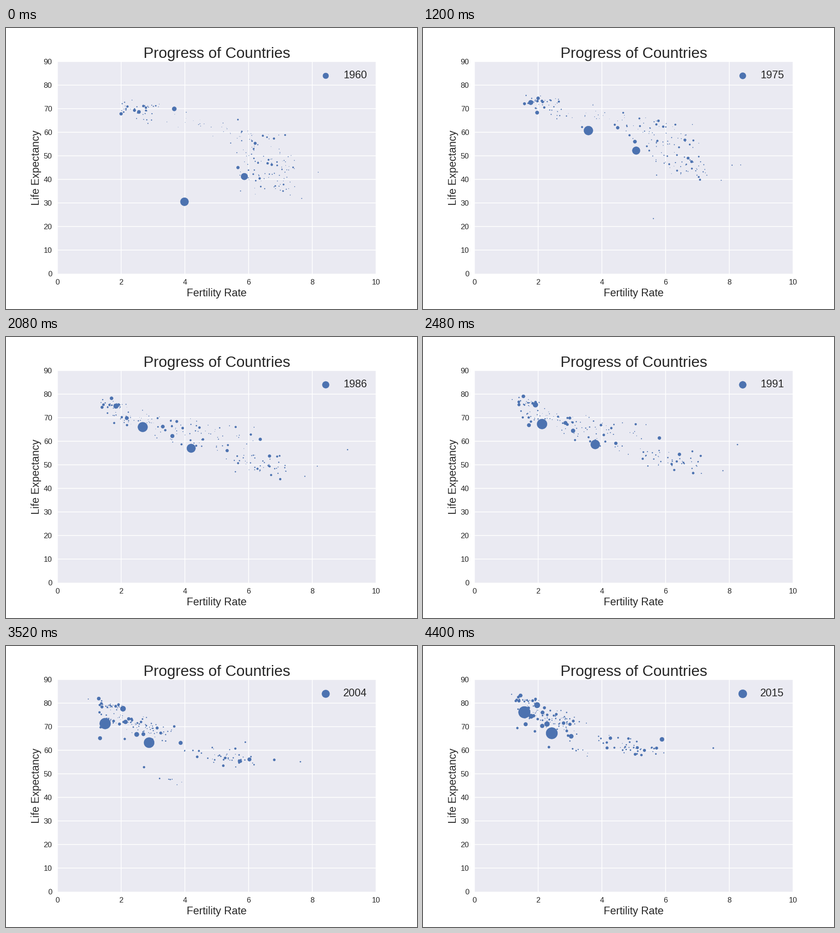
A matplotlib script for the animation above (4.48 s loop, 903 by 620 pixels).

```python
import numpy as np
import matplotlib.pyplot as plt
from matplotlib.animation import FuncAnimation

W, H, DPI = 903, 620, 120
BLUE, PANEL, INK = "#4C72B0", "#EAEAF2", "#262626"
PEOPLE_PER_AREA = 5.65  # millions per square point

plt.rcParams["font.family"] = "Liberation Sans"
plt.rcParams["text.color"] = INK

YEARS = np.arange(1960, 2016)
PROGRESS = (YEARS - YEARS[0]) / (YEARS[-1] - YEARS[0])
ANCHORS = [1960, 1966, 1975, 1986, 1995, 2004, 2015]
rng = np.random.default_rng(11)
countries = []  # (population, fertility, life expectancy) series


def growth(start, end):
    return start * (end / start) ** PROGRESS


def dip(year, depth, width):
    return depth * np.exp(-((YEARS - year) / width) ** 2)


def track(pop, fert, life, shock=0, fert_years=ANCHORS, life_years=ANCHORS):
    """A country that follows known points."""
    countries.append((growth(*pop),
                      np.interp(YEARS, fert_years, fert),
                      np.interp(YEARS, life_years, life) - shock))


def transition(p0, p1, f0, f1, mid, width, l0, l1, bend, shock=0):
    """A country whose fertility falls along a logistic curve."""
    s = 1 / (1 + np.exp(-(YEARS - mid) / width))
    s = (s - s[0]) / (s[-1] - s[0])
    countries.append((growth(p0, p1), f0 + (f1 - f0) * s,
                      l0 + (l1 - l0) * PROGRESS ** bend - shock))


def lerp(span, u):
    return span[0] + (span[1] - span[0]) * u


def crowd(n, pop, spread, grow, f0, f1, mid, l0, l1, bend, noise=2.0, shock=0):
    """Small countries: higher fertility goes with shorter lives."""
    for _ in range(n):
        q = rng.random()
        r = 0.5 * q + 0.5 * rng.random()
        start = min(pop * np.exp(spread * rng.normal()), 20)
        wobble = rng.normal(0, noise, 2).clip(-2 * noise, 2 * noise)
        transition(start, start * grow * rng.uniform(0.75, 1.25),
                   lerp(f0, q), lerp(f1, r),
                   rng.uniform(*mid), rng.uniform(3.5, 8),
                   lerp(l0, q) + wobble[0], lerp(l1, r) + 0.6 * wobble[1],
                   bend * rng.uniform(0.85, 1.15), shock)


# The largest populations
track((667, 1376),
      [3.99, 3.28, 5.97, 7.4, 6.14, 6.05, 6.21, 5.3, 6.4, 5.72, 5.75, 4.92,
       3.58, 2.85, 2.7, 2.68, 1.68, 1.5, 1.57],
      [30.6, 34, 43, 49, 55.4, 60.8, 66.1, 68.4, 71.4, 76.2],
      fert_years=[*range(1960, 1971), 1972, 1975, 1977, 1980, 1986, 1995,
                  2004, 2015],
      life_years=[1960, 1961, 1962, 1963, *ANCHORS[1:]])
track((450, 1311), [5.87, 5.75, 5.08, 4.2, 3.47, 2.88, 2.43],
      [41.3, 45.8, 52.3, 57.1, 60, 63.3, 67.3])
track((186, 322), [3.67, 2.71, 1.77, 1.84, 1.98, 2.06, 1.97],
      [70, 70.5, 72.7, 75, 76, 77.7, 79.2])
track((120, 143), [2.56, 2.1, 1.97, 2.18, 1.34, 1.34, 1.61],
      [68.7, 69.5, 68.4, 69.9, 64.5, 65.2, 71.1])
track((93, 127), [2.0, 2.0, 2.0, 1.7, 1.41, 1.3, 1.45],
      [67.9, 71.2, 74.5, 78.3, 79.8, 82, 83.3])
track((88, 258), [5.67, 5.6, 5.04, 3.61, 2.69, 2.49, 2.28],
      [45.1, 44.3, 56.1, 62.3, 66.3, 66.8, 71.2])
track((72, 208), [6.21, 5.66, 4.5, 3.31, 2.5, 2.14, 1.78],
      [55.4, 58.2, 62, 66.3, 69.1, 72.1, 74.5])
track((45, 182), [6.35, 6.34, 6.82, 6.66, 6.26, 6.03, 5.89],
      [40.5, 43.9, 47.6, 53.8, 55.1, 56.2, 64.7])
track((46, 189), [6.6, 6.6, 6.61, 6.37, 5.36, 3.87, 3.04],
      [46.9, 51.8, 56.8, 60.9, 61.9, 63.2, 66])
track((49, 161), [6.73, 6.9, 6.71, 5.33, 3.73, 2.7, 2.13],
      [46.3, 48.7, 49.1, 56.1, 61.7, 66.9, 70.4])
track((15, 76), [6.0, 6.12, 6.36, 6.9, 7.27, 6.81, 5.72],
      [44, 46.3, 50.4, 53.6, 54.1, 56, 61])
track((17, 55), [6.17, 6.0, 5.49, 4.18, 3.11, 2.72, 2.34],
      [49, 51, 52.3, 60.5, 62.8, 52.9, 61.4])

# Outliers, some with a sudden loss of life
track((5.2, 26), [7.67, 7.67, 8.09, 9.11, 7.58, 5.9, 4.28],
      [32, 35.2, 46.1, 56.5, 60.4, 63.5, 65.5])
track((3, 11.6), [8.19, 8.2, 8.36, 8.16, 6.3, 5.6, 3.9],
      [43.1, 45, 46.2, 49.5, 44, 53, 66], dip(1994, 31, 0.5))
track((5.7, 15.5), [6.97, 6.7, 5.62, 6.2, 5.1, 3.4, 2.6],
      [41.8, 43, 44, 53, 57, 64, 69], dip(1976.7, 26, 3.5))
track((3.9, 10.7), [6.32, 6.2, 5.6, 6.1, 4.9, 4.0, 3.0],
      [42, 45.5, 50, 54, 57, 60, 64], dip(2010, 30, 0.4))
track((3, 7.3), [5.2, 4.1, 2.6, 1.37, 1.04, 0.97, 1.17],
      [64, 69, 72.5, 76.5, 78.8, 81.8, 83.8])
track((3.4, 19.9), [7.45, 7.5, 7.75, 7.77, 7.83, 7.63, 7.5],
      [37, 38, 39.7, 45.2, 49.5, 55.2, 61])

# Mid-sized populations
for row in [
    (73, 81, 2.42, 1.4, 1971, 2.5, 69.4, 81, 1.1),
    (52, 65, 2.7, 1.83, 1971, 2.5, 71.2, 81.1, 1.2),
    (46, 64, 2.78, 1.92, 1972, 2.5, 70.5, 81.8, 1.05),
    (50, 60, 2.42, 1.38, 1978, 3, 69.3, 82.6, 1),
    (30, 46, 2.78, 1.33, 1982, 3, 69.3, 81.5, 0.9),
    (43, 45, 2.2, 1.35, 1990, 3, 71, 69.5, 1),
    (38, 127, 6.8, 2.14, 1982, 6, 57.4, 76.1, 0.7),
    (34, 93, 6.45, 1.86, 1985, 5, 58.6, 74.7, 1.1),
    (26, 101, 7.15, 2.8, 1978, 12, 58.9, 71.6, 0.8),
    (27, 68, 6.2, 1.5, 1977, 5, 55.5, 74.8, 0.7),
    (27, 78, 6.3, 2.2, 1978, 8, 47.1, 78.1, 0.75),
    (27, 93, 6.63, 3.0, 1983, 9, 48.4, 71.1, 0.8),
    (22, 79, 6.9, 1.7, 1991, 3, 46, 78, 0.85),
    (22, 99, 7.1, 4.27, 2007, 6, 37.9, 65.2, 2),
    (25, 51, 6.16, 1.3, 1972, 6, 53, 81, 0.85),
    (21, 52, 6.15, 1.9, 1985, 7, 42.3, 68.1, 0.6),
]:
    transition(*row)

# Small countries: early, middle, fast and late transitions
crowd(20, 5, 0.9, 1.4, (2.0, 3.2), (1.35, 2.05), (1968, 1980),
      (71, 70), (81.5, 80), 1.05, 1.5)
crowd(14, 6, 0.8, 1.2, (1.95, 3.6), (1.3, 1.9), (1978, 1992),
      (69, 65), (77, 73), 1.2, 1.5)
crowd(26, 0.7, 1.5, 2.2, (3.6, 6.3), (1.5, 2.7), (1970, 1985),
      (67, 56), (78, 71), 0.75)
crowd(46, 2.8, 1.3, 3.2, (5.6, 7.5), (1.9, 3.6), (1976, 1994),
      (58, 48), (76, 68), 0.75, 4)
crowd(40, 3.6, 0.9, 3.9, (5.7, 7.4), (3.7, 6.2), (1990, 2006),
      (42, 38), (65, 58), 0.95, 3.5)
crowd(6, 1.8, 0.9, 3.0, (5.9, 7.2), (2.9, 3.9), (1984, 1992),
      (50, 45), (64, 58), 0.5, 2, dip(2004, 13, 8))

pop, fert, life = np.array(countries).transpose(1, 0, 2)

fig = plt.figure(figsize=(W / DPI, H / DPI), dpi=DPI, facecolor="white")
ax = fig.add_axes([0.125, 0.125, 0.775, 0.755], facecolor=PANEL)
ax.set(xlim=(0, 10), ylim=(0, 90),
       xticks=range(0, 11, 2), yticks=range(0, 91, 10))
ax.set_axisbelow(True)
ax.grid(color="white", lw=1)
ax.tick_params(length=0, pad=7, labelsize=10, labelcolor=INK)
for spine in ax.spines.values():
    spine.set_visible(False)


def label(x, y, text, size, ha="center", **kw):
    return fig.text(x / W, 1 - y / H, text, size=size, ha=ha,
                    va="baseline", rotation_mode="anchor", **kw)


label(463, 66, "Progress of Countries", 20)
label(463, 592, "Fertility Rate", 14)
label(73.5, 308.5, "Life Expectancy", 14, rotation=90)
year_text = label(740.8, 111.3, "", 14, ha="left")

style = dict(color=BLUE, edgecolors="face", linewidths=0.3)
dots = ax.scatter(fert[:, 0], life[:, 0], **style)
key = ax.scatter([8.416], [84.1], **style)


def update(i):
    area = pop[:, i] / PEOPLE_PER_AREA
    dots.set_offsets(np.column_stack([fert[:, i], life[:, i]]))
    dots.set_sizes(area)
    key.set_sizes([(area.max() + area.min()) / 2])
    year_text.set_text(str(YEARS[i]))
    return dots, key, year_text


anim = FuncAnimation(fig, update, frames=len(YEARS), interval=80, repeat=True)
plt.show()
```
